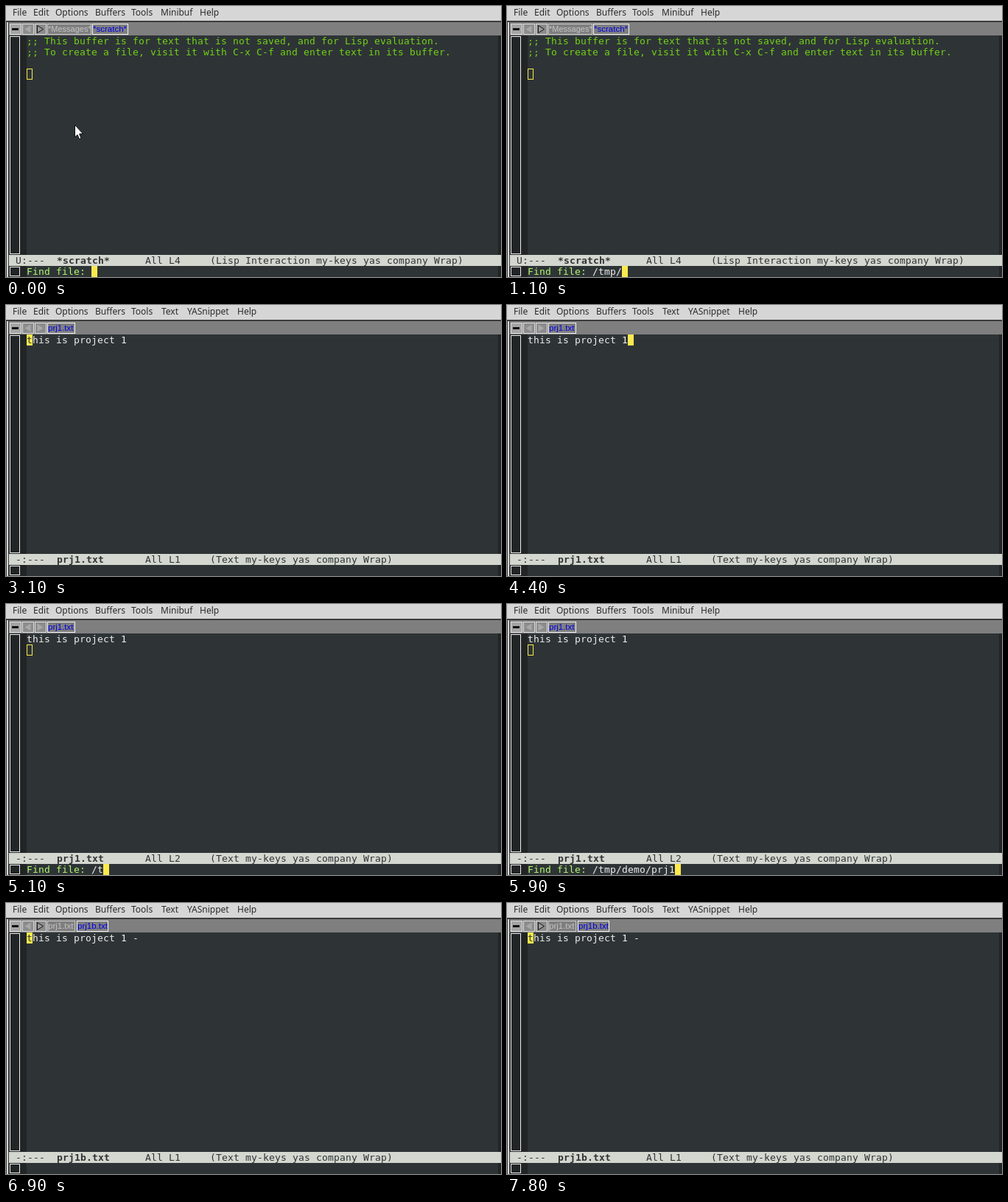
Write an HTML page with a canvas that moves like this. It is 672x368 px and loops after 8 s.

```html
<!DOCTYPE html>
<html lang="en">
<head>
<meta charset="utf-8">
<title>Editor session</title>
<style>
html, body { margin: 0; width: 100%; height: 100%; overflow: hidden; background: #2e3436; }
canvas { display: block; }
</style>
</head>
<body>
<canvas id="stage" width="672" height="368"></canvas>
<script>
const ctx = document.getElementById('stage').getContext('2d');
const LOOP = 8000, CELL = 8, ROW = 15, LEFT = 28, TOP = 40;
const BG = '#2e3436', FG = '#eeeeec', DARK = '#212526', YELLOW = '#fce94f', EDGE = '#3c3c3c';
const MONO = '13px "DejaVu Sans Mono", monospace';
const MENU = '12px "Noto Sans", "Open Sans", sans-serif';
const TAB = '"Liberation Sans", Arial, sans-serif';
const PATH = '/tmp/demo/p';

function rect(x, y, w, h, color) {
  ctx.fillStyle = color;
  ctx.fillRect(x, y, w, h);
}
function box(x, y, w, h, color) {
  ctx.strokeStyle = color;
  ctx.lineWidth = 1;
  ctx.strokeRect(x + .5, y + .5, w - 1, h - 1);
}
function text(s, x, y, color, font) {
  ctx.font = font;
  ctx.fillStyle = color;
  ctx.fillText(s, x, y);
}
// Terminal text: one character per cell
function cells(s, x, y, color, font = MONO) {
  [...s].forEach((c, i) => text(c, x + i * CELL, y, color, font));
}
function shape(points, fill, stroke) {
  ctx.beginPath();
  points.forEach(([x, y]) => ctx.lineTo(x, y));
  ctx.closePath();
  if (fill) { ctx.fillStyle = fill; ctx.fill(); }
  if (stroke) { ctx.strokeStyle = stroke; ctx.lineWidth = 1; ctx.stroke(); }
}
const line = (s, row, color = FG, top = TOP) => cells(s, LEFT, top + row * ROW + 12, color);
const hollow = (row, top = TOP) => box(LEFT, top + row * ROW, CELL, ROW, YELLOW);
const solid = (col, y) => rect(LEFT + col * CELL, y, CELL, ROW, YELLOW);

function menu(mode) {
  rect(0, 0, 672, 20, '#d6d6d6');
  const items = [['File', 9], ['Edit', 37], ['Options', 67], ['Buffers', 121], ['Tools', 170]];
  if (mode === 'text') items.push(['Text', 211], ['YASnippet', 246], ['Help', 314]);
  else items.push(['Minibuf', 210], ['Help', 263]);
  for (const [s, x] of items) text(s, x, 13, '#2b2b2b', MENU);
}

function tabs(list, canScroll) {
  rect(4, 22, 668, 18, '#7f7f7f');
  for (const x of [5, 22, 39]) {
    rect(x, 24, 16, 15, x === 5 ? '#a5a5a5' : '#8c8c8c');
    box(x, 24, 16, 15, '#dedede');
  }
  rect(8, 30, 9, 3, '#111');
  shape([[33.5, 26.5], [33.5, 36.5], [25.5, 31.5]], '#a8a8a8');
  const arrow = [[42.5, 26.5], [42.5, 36.5], [50.5, 31.5]];
  if (canScroll) shape(arrow, '#9a9a9a', '#111');
  else shape(arrow, '#a8a8a8');
  list.forEach(([name, x, w, size], i) => {
    const current = i === list.length - 1;
    box(x, 24, w, 15, current ? '#f2f2f2' : '#c8c8c8');
    text(name, x + 1, 35, current ? '#0000e6' : '#c4c4c4', `${size}px ${TAB}`);
  });
}

function modeLine(y, flags, name, where, modes, active = true) {
  const color = active ? BG : FG;
  rect(4, y, 668, ROW, active ? '#d3d7cf' : '#555753');
  cells(flags, 13, y + 12, color);
  cells(name, 69, y + 12, color, 'bold ' + MONO);
  const x = Math.max(189, 69 + (name.length + 3) * CELL);
  cells(where, x, y + 12, color);
  cells(modes, x + 11 * CELL, y + 12, color);
}

function pane(y, bottom) {
  rect(4, y, 668, bottom - y, DARK);
  rect(LEFT, y, 640, bottom - y, BG);
  box(5, y + 1, 14, bottom - y - 2, FG);
}

function minibuffer(input) {
  pane(353, 368);
  if (input === null) return;
  cells('Find file:', LEFT, 365, '#b4fa70');
  cells(input, LEFT + 11 * CELL, 365, FG);
  solid(11 + input.length, 353);
}

function completions() {
  pane(233, 338);
  const rows = ['Click on a completion to select it.',
    'In this buffer, type RET to select the completion near point.', '',
    'Possible completions are:', 'prj1 txt', 'prj1 .txt'];
  rows.forEach((s, i) => line(s, i, FG, 233));
  cells('.', LEFT + 4 * CELL, 305, FG, 'bold ' + MONO);
  cells('b', LEFT + 4 * CELL, 320, FG, 'bold ' + MONO);
  hollow(0, 233);
  modeLine(338, 'U:%*-', '*Completions*', 'All L1',
    '(Completion List my-keys yas company Wrap)', false);
}

function pointer() {
  shape([[93.5, 161.5], [93.5, 178], [97, 174.8], [99.5, 180.5], [102, 179.5],
    [99.6, 173.8], [104.5, 173.5]], '#fff', '#111');
}

// What has been typed at the prompt, or null when it is closed
function typed(t) {
  const keys = (start, step) => PATH.slice(0, Math.max(0, Math.floor((t - start) / step) + 1));
  if (t < 2400) return keys(400, 170);
  if (t < 2900) return PATH + 'rj1' + '.txt'.slice(0, Math.floor((t - 2400) / 100));
  if (t < 4800) return null;
  if (t < 5850) return keys(5000, 80);
  if (t < 6900) return PATH + (t < 6400 ? 'rj1' : 'rj1b');
  return null;
}

function topCursor() {
  solid(0, TOP);
  line('t', 0, BG);
}

function draw(t) {
  const input = typed(t), split = t >= 6200 && t < 6900, bottom = split ? 218 : 338;
  const textModes = '(Text my-keys yas company Wrap)';
  rect(0, 0, 672, 368, EDGE);
  rect(1, 22, 2, 346, '#d6d6d6');
  menu(input === null ? 'text' : 'prompt');
  pane(TOP, bottom);

  if (t < 2900) {
    tabs([['*Messages*', 56, 60, 11], ['*scratch*', 117, 49, 11.5]], true);
    line(';; This buffer is for text that is not saved, and for Lisp evaluation.', 0, '#73d216');
    line(';; To create a file, visit it with C-x C-f and enter text in its buffer.', 1, '#73d216');
    hollow(3);
    modeLine(338, 'U:---', '*scratch*', 'All L4', '(Lisp Interaction my-keys yas company Wrap)');
    if (t < 400) pointer();
  } else if (t < 6900) {
    tabs([['prj1.txt', 56, 38, 11.5]], false);
    line('this is project 1', 0);
    if (t < 4100) topCursor();
    else if (t < 4600) solid(17, TOP);
    else if (input === null) solid(0, TOP + ROW);
    else hollow(1);
    modeLine(bottom, '-:---', 'prj1.txt', t < 4600 ? 'All L1' : 'All L2', textModes);
    if (split) completions();
  } else {
    tabs([['prj1.txt', 56, 38, 11.5], ['prj1b.txt', 96, 43, 11.5]], true);
    line('this is project 1 -', 0);
    topCursor();
    modeLine(338, '-:---', 'prj1b.txt', 'All L1', textModes);
  }
  minibuffer(input);
}

const begin = performance.now();
function frame() {
  draw((performance.now() - begin) % LOOP);
  requestAnimationFrame(frame);
}
frame();
</script>
</body>
</html>
```
